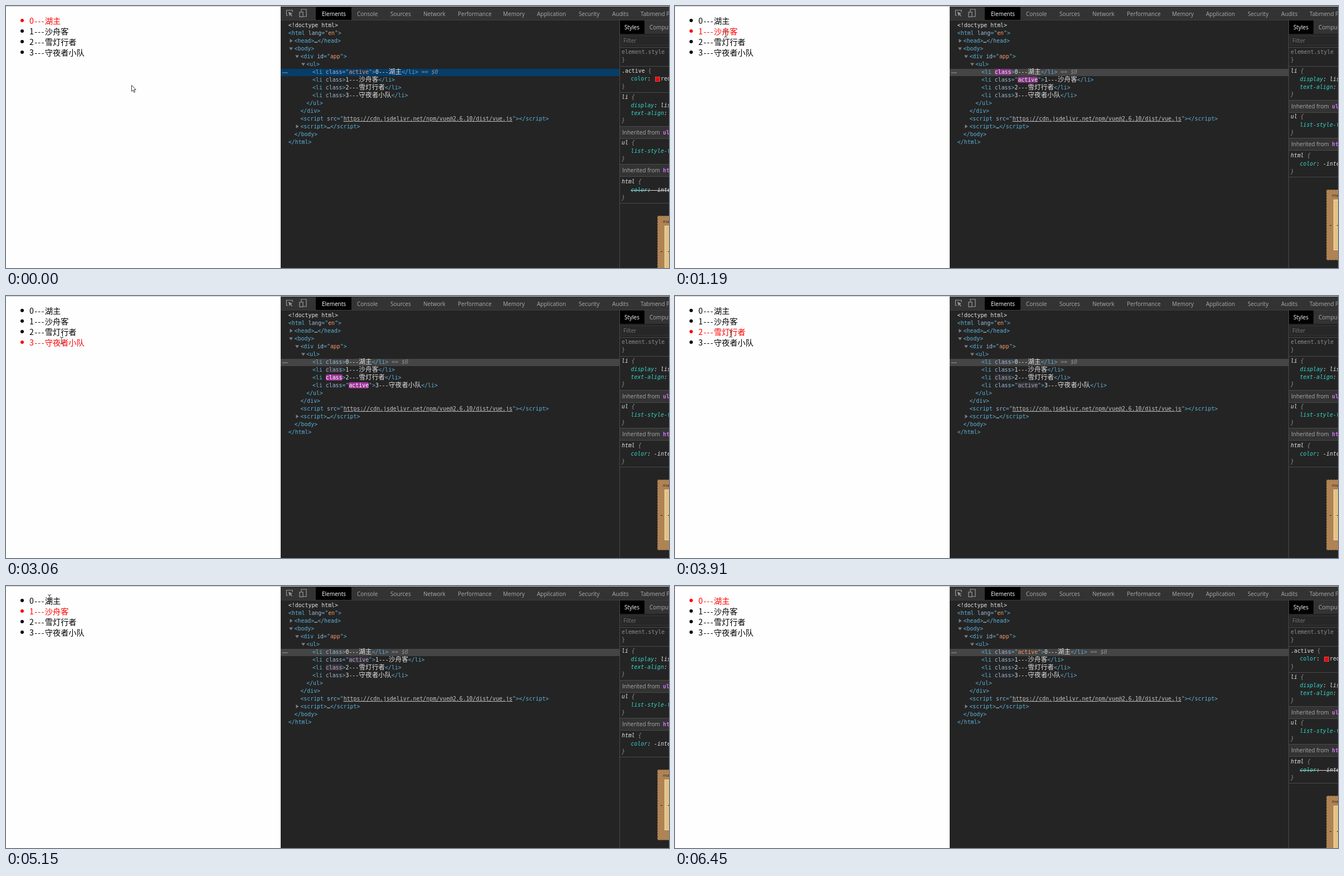
Animation of 1190x471 px, one loop 6690 ms. Source, as an HTML page:

```html
<!DOCTYPE html>
<html lang="zh-CN">
<head>
<meta charset="utf-8">
<title>Active list item</title>
<style>
  html, body { margin: 0; width: 100%; height: 100%; overflow: hidden; background: #fff; }
  #stage { position: relative; width: 1190px; height: 471px; overflow: hidden; background: #fefefe; }
  #stage div, #stage svg { position: absolute; }
  .line { white-space: pre; height: 14px; line-height: 14px; }
  .ui { font: 10px/14px "Open Sans", "Noto Sans", sans-serif; color: #a8abae; }
  .mono { font: 9.88px/14px "DejaVu Sans Mono", "Noto Sans Mono", monospace; color: #e2e2e2; }
  .on { color: #fff; }
  .cjk { font: 300 11.7px/0 "Noto Sans CJK SC", "Noto Sans CJK", sans-serif; }
  .item { font: 14.2px/14px "Noto Sans CJK SC", "Noto Sans CJK", sans-serif; }
  .item span { letter-spacing: .09em; }
  .item i { position: absolute; left: -16px; top: 4px; width: 6px; height: 6px; border-radius: 50%; background: currentColor; }
  .tag { color: #5db0d7; }
  .key { color: #9bbbdc; }
  .val { color: #f29766; }
  .url { color: #c4c4c4; text-decoration: underline; }
  .note { color: #8b8f93; font-style: italic; }
  .dim { color: #8c8c8c; }
  .ua { font-style: italic; }
  .prop { color: #35d4c7; }
  .node { color: #d070f0; font-weight: bold; }
  .flash { border-radius: 2px; }
  .struck { text-decoration: line-through; text-decoration-color: #ddd; }
</style>
</head>
<body>
<div id="stage"></div>
<script>
const LOOP = 6690;
const NAMES = ['湖主', '沙舟客', '雪灯行者', '守夜者小队'];
// [page reacts, inspector reacts, chosen item]
const CLICKS = [
  [1030, 1110, 1], [2190, 2270, 2], [2980, 3060, 3],
  [3840, 4000, 2], [4450, 4530, 1], [5230, 5310, 0]
];
// [time, x, y]
const PATH = [
  [70, 225, 142], [710, 101, 46], [800, 101, 46], [1030, 91, 50], [1190, 91, 50],
  [1420, 96, 59], [1590, 97, 61], [1740, 97, 61], [1820, 88, 58], [1880, 95, 63],
  [2350, 95, 63], [2830, 100, 80], [3290, 100, 80], [3670, 100, 68], [4000, 100, 68],
  [4300, 100, 48], [4530, 100, 48], [5080, 78, 22], [5400, 78, 22], [5770, 88, 30],
  [6420, 944, 437]
];
const CURSOR_GONE = 6450;

const stage = document.getElementById('stage');

function add(parent, cls, css, html = '') {
  const el = document.createElement('div');
  el.className = cls;
  el.style.cssText = css;
  el.innerHTML = html;
  parent.append(el);
  return el;
}
const box = (parent, x, y, w, h, css) =>
  add(parent, '', `left:${x}px;top:${y}px;width:${w}px;height:${h}px;box-sizing:border-box;${css}`);
const text = (parent, cls, x, y, html) =>
  add(parent, 'line ' + cls, `left:${x}px;top:${y - 7}px`, html);
const span = (cls, s) => `<span class="${cls}">${s}</span>`;
const tag = (name, attrs = '') => span('tag', `&lt;${name}${attrs}&gt;`);
const attr = (key, val, cls = 'val') => ` ${span('key', key)}="${span(cls, val)}"`;

// Web page
const items = NAMES.map((name, i) =>
  text(stage, 'item', 42, 26 + 19 * i, `<i></i><span>${i}---</span>${name}`));

// Inspector frame
box(stage, 493, 0, 697, 471, 'background:#242424');
box(stage, 493, 0, 697, 26, 'background:#333;border-bottom:1px solid #3d3d3d');
box(stage, 0, 0, 1190, 1, 'background:#c4c4c4');
box(stage, 556, 2, 64, 23, 'background:#000');
const TABS = {
  Elements: 567, Console: 630, Sources: 690, Network: 749, Performance: 811, Memory: 892,
  Application: 953, Security: 1028, Audits: 1088, 'Tabmend Pr': 1139
};
for (const [name, x] of Object.entries(TABS))
  text(stage, name === 'Elements' ? 'ui on' : 'ui', x, 14, name);
stage.insertAdjacentHTML('beforeend', `
  <svg style="left:500px;top:4px" width="44" height="18" fill="none" stroke="#999" stroke-width="1.2">
    <path d="M6 13H3.5V3.5H14V7"/><path d="M7 6l7 4-3 .8 3 3-1 1-3-3-1.2 2.8z" fill="#999" stroke="none"/>
    <path d="M30 6V2h9v13h-5"/><rect x="27" y="7" width="6" height="8.5"/>
  </svg>`);

// Element tree
const selected = box(stage, 493, 113, 608, 13, '');
stage.insertAdjacentHTML('beforeend', `
  <svg style="left:495px;top:112px" width="12" height="14" fill="#9a9a9a">
    <circle cx="2.5" cy="8" r="1.1"/><circle cx="5.8" cy="8" r="1.1"/><circle cx="9.1" cy="8" r="1.1"/>
  </svg>`);

const node = (row, depth, html) => text(stage, 'mono', 506.8 + 10.8 * depth, 35 + 14 * row, html);
function arrow(row, depth, open) {
  const d = open ? 'M0 1.5H7L3.5 6.5Z' : 'M1.5 0V7L6.5 3.5Z';
  stage.insertAdjacentHTML('beforeend',
    `<svg width="8" height="8" fill="#7d7d7d" style="left:${497.4 + 10.8 * depth}px;top:${31 + 14 * row}px"><path d="${d}"/></svg>`);
}
const script = 'https://cdn.jsdelivr.net/npm/vue@2.6.10/dist/vue.js';

node(0, 0, '&lt;!doctype html&gt;');
node(1, 0, tag('html', attr('lang', 'en')));
node(2, 1, tag('head') + '…' + tag('/head'));
node(3, 1, tag('body'));
node(4, 2, tag('div', attr('id', 'app')));
node(5, 3, tag('ul'));
const rows = NAMES.map((name, i) => {
  const cls = ` ${span('key flash', 'class')}<span class="value">="${span('val flash', 'active')}"</span>`;
  const el = node(6 + i, 4, tag('li', cls) + `${i}---` + span('cjk', name) + tag('/li') +
    (i ? '' : span('note', ' == $0')));
  const find = s => el.querySelector(s);
  return { key: find('.key'), value: find('.value'), val: find('.val') };
});
node(10, 3, tag('/ul'));
node(11, 2, tag('/div'));
node(12, 2, tag('script', attr('src', script, 'url')) + tag('/script'));
node(13, 2, tag('script') + '…' + tag('/script'));
node(14, 1, tag('/body'));
node(15, 0, tag('/html'));
[[2, 1, 0], [3, 1, 1], [4, 2, 1], [5, 3, 1], [13, 2, 0]].forEach(a => arrow(...a));

// Styles pane
const pane = box(stage, 1101, 26, 89, 445, 'background:#242424;border-left:1px solid #4a4a4a;overflow:hidden');
const layer = () => box(pane, -1102, -26, 1190, 600, '');
const rule = (parent, y) => box(parent, 1102, y, 88, 1, 'background:#4a4a4a');
const fixed = layer(), activeRule = layer(), lower = layer();

box(fixed, 1102, 26, 88, 24, 'background:#333');
box(fixed, 1102, 26, 44, 24, 'background:#000');
text(fixed, 'ui on', 1110, 38, 'Styles');
text(fixed, 'ui', 1155, 38, 'Computed');
box(fixed, 1104, 53, 90, 18, 'background:#272727;border:1px solid #363636');
text(fixed, 'ui', 1108, 62, 'Filter').style.color = '#777';
rule(fixed, 74);
text(fixed, 'mono dim', 1105, 83, 'element.style {');
text(fixed, 'mono dim', 1105, 97, '}');
rule(fixed, 108);

text(activeRule, 'mono', 1105, 117, '.active ' + span('dim', '{'));
text(activeRule, 'mono', 1121.5, 131, span('prop', 'color') + ':');
box(activeRule, 1165, 127, 9, 9, 'background:#f00;border:1px solid #b55');
text(activeRule, 'mono', 1175, 131, 'red;');
text(activeRule, 'mono dim', 1105, 145, '}');
rule(activeRule, 155);

function uaRule(y, name, props) {
  text(lower, 'mono ua', 1105, y, name + span('dim', ' {'));
  const lines = props.map(([key, value], i) =>
    text(lower, 'mono ua', 1121.5, y + 15 + 13.5 * i, span('prop', key) + ': ' + value + ';'));
  const end = y + 15 + 13.5 * props.length;
  text(lower, 'mono ua dim', 1105, end, '}');
  rule(lower, Math.floor(end + 10));
  return lines;
}
function inherited(y, name) {
  box(lower, 1102, y, 88, 22, 'background:#333;border-bottom:1px solid #4a4a4a');
  text(lower, 'ui', 1106, y + 10, 'Inherited from');
  text(lower, 'mono node', 1179, y + 11, name);
}
uaRule(164, 'li', [['display', 'list-item'], ['text-align', '-webkit-match-parent']]);
inherited(217, 'ul');
uaRule(246, 'ul', [['list-style-type', 'disc']]);
inherited(285, 'html');
const [htmlColor] = uaRule(316, 'html', [['color', '-internal-root-color']]);
box(lower, 1169, 377, 60, 127, 'background:#b08354;border:1px dashed #5e4930');
box(lower, 1182, 395, 40, 91, 'background:#e3c381;border:1px solid #f0dfb8');
text(lower, 'ui', 1179, 387, 'margin').style.cssText += 'font-size:8px;color:#2b2118';
for (const x of [1175, 1188]) box(lower, x, 441, 3, 1, 'background:#2b2118');

// Pointer
stage.insertAdjacentHTML('beforeend', `
  <svg id="pointer" style="left:0;top:0" width="1190" height="471">
    <path id="arrow" d="M.5 .5V11.5L3 9.2 4.8 13.3 6.6 12.5 4.8 8.5H8.2Z" fill="#fff" stroke="#222" stroke-width=".9"/>
    <path id="beam" d="M-3-6h2l1 1 1-1h2M0-5V5M-3 6h2l1-1 1 1h2" fill="none" stroke="#333"/>
  </svg>`);
const [pointer, arrowShape, beamShape] = ['pointer', 'arrow', 'beam'].map(id => document.getElementById(id));

function pointerAt(t) {
  const i = PATH.findIndex(p => p[0] > t);
  if (i < 1) return (i ? PATH[PATH.length - 1] : PATH[0]).slice(1);
  const [t0, x0, y0] = PATH[i - 1], [t1, x1, y1] = PATH[i];
  const u = (t - t0) / (t1 - t0), k = u * u * (3 - 2 * u);
  return [x0 + (x1 - x0) * k, y0 + (y1 - y0) * k];
}

const blend = (a, b, k) => `rgb(${a.map((v, i) => Math.round(v + (b[i] - v) * k))})`;

// Purple highlight that fades out after an attribute changes
function paintFlash(el, age) {
  const u = age / 1120;
  const k = 1 - (1 - Math.min(u, 1)) ** 3;
  const lit = u >= 0 && u < 1;
  el.style.background = lit && u < 0.9 ? blend([158, 54, 153], [46, 48, 58], k) : '';
  el.style.color = lit ? blend([255, 255, 255], [166, 166, 170], k) : '';
}

function draw(t) {
  const last = column => CLICKS.filter(c => c[column] <= t).pop();
  const shown = last(0)?.[2] ?? 0;
  const known = last(1)?.[2] ?? 0;

  items.forEach((el, i) => el.style.color = i === shown ? '#f00' : '#000');
  selected.style.background = last(0) ? '#454545' : '#073d69';

  rows.forEach((row, i) => {
    row.value.style.display = i === known ? '' : 'none';
    let gained = Infinity, lost = Infinity, previous = 0;
    for (const [, at, pick] of CLICKS) {
      if (at > t) break;
      if (pick === i) gained = t - at;
      if (previous === i) lost = t - at;
      previous = pick;
    }
    paintFlash(row.val, gained);
    paintFlash(row.key, i === known ? Infinity : lost);
  });

  activeRule.style.display = known ? 'none' : '';
  lower.style.transform = known ? 'translateY(-47px)' : '';
  htmlColor.classList.toggle('struck', !known);

  const [x, y] = pointerAt(t);
  const overText = x < 142 && y > 14 && y < 93;
  const place = `translate(${x.toFixed(1)} ${y.toFixed(1)})`;
  arrowShape.setAttribute('transform', place);
  beamShape.setAttribute('transform', place);
  arrowShape.style.display = overText ? 'none' : '';
  beamShape.style.display = overText ? '' : 'none';
  pointer.style.display = t < CURSOR_GONE ? '' : 'none';
}

const start = performance.now();
function tick() {
  draw((performance.now() - start) % LOOP);
  requestAnimationFrame(tick);
}
tick();
</script>
</body>
</html>
```
